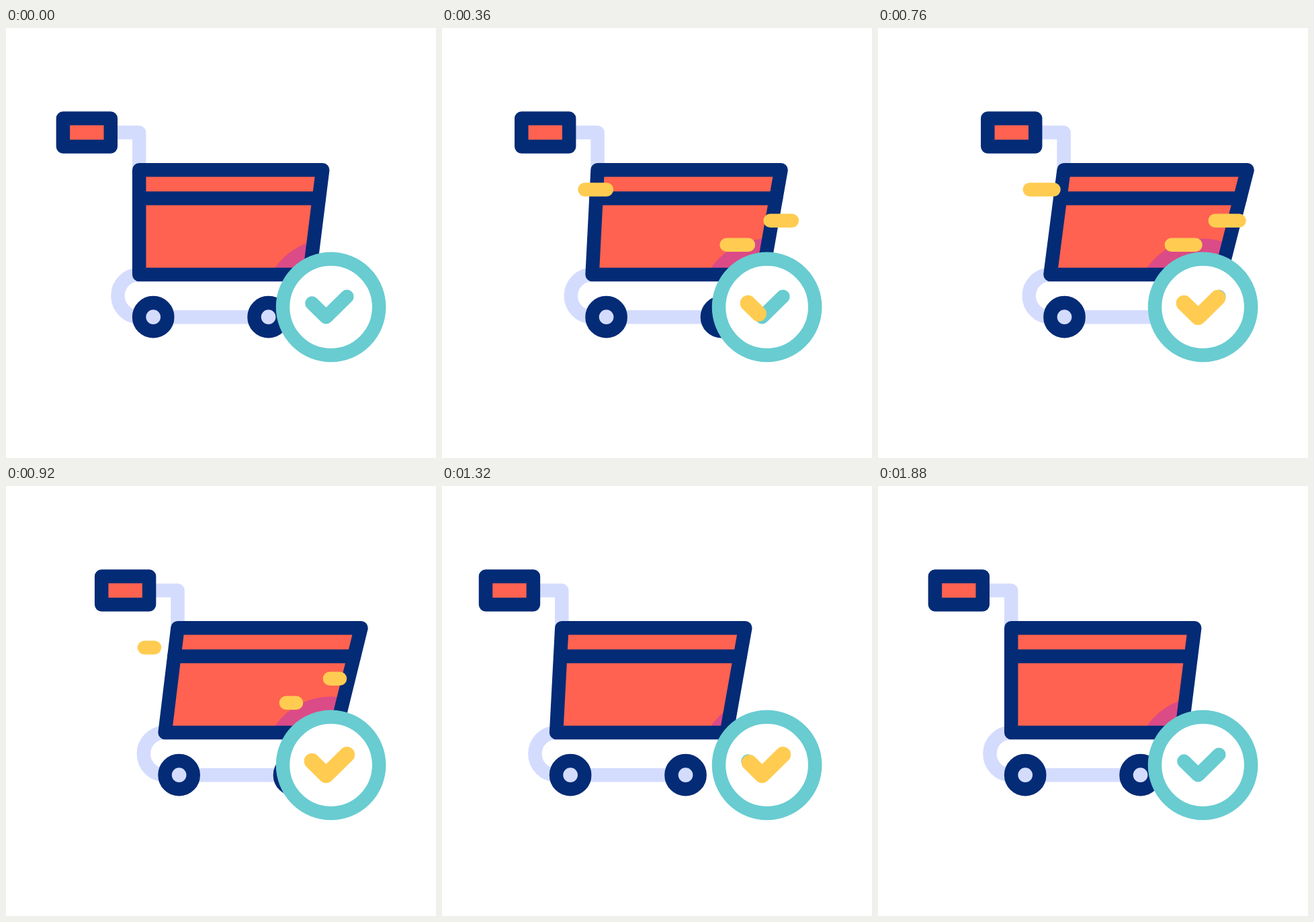
Write an HTML page with a canvas that moves like this. It is 640 px wide and 640 px high and loops after 2000 ms.

```html
<!DOCTYPE html>
<html lang="en">
<head>
<meta charset="utf-8">
<title>Shopping cart</title>
<style>
  html, body { margin: 0; width: 100%; height: 100%; overflow: hidden; background: #fff; }
  canvas { display: block; }
</style>
</head>
<body>
<canvas width="640" height="640"></canvas>
<script>
const ctx = document.querySelector('canvas').getContext('2d');
const LOOP = 2000, STEP = 40, STROKE = 20.5;
const NAVY = '#042b76', RED = '#ff6250', PINK = '#db4b87', PALE = '#d4dcfe',
      TEAL = '#68ccd1', YELLOW = '#ffcc51';

// Keyframes: [time, value]
const TOP = [[80, 0], [700, 80], [1370, -21], [1775, 0]];
const BASE = [[80, 0], [695, 60], [1353, -28.5], [1767, 0]];

const progress = (t, from, to) => Math.min(1, Math.max(0, (t - from) / (to - from)));
const smooth = u => u * u * (3 - 2 * u);

// cubic-bezier(.42, 0, .58, 1), solved by bisection
function ease(u) {
  let lo = 0, hi = 1;
  for (let i = 0; i < 20; i++) {
    const p = (lo + hi) / 2, q = 1 - p;
    if (3 * p * q * (0.42 * q + 0.58 * p) + p ** 3 < u) lo = p; else hi = p;
  }
  return smooth(lo);
}

function track(keys, t) {
  let value = keys[0][1];
  for (let i = 1; i < keys.length; i++) {
    const [t0, v0] = keys[i - 1], [t1, v1] = keys[i];
    if (t > t0) value = v0 + (v1 - v0) * ease(progress(t, t0, t1));
  }
  return value;
}

function poly(points, close) {
  const path = new Path2D();
  points.forEach(([x, y]) => path.lineTo(x, y));
  if (close) path.closePath();
  return path;
}

function circle(x, y, r) {
  const path = new Path2D();
  path.arc(x, y, r, 0, 7);
  return path;
}

function stroke(path, color, width = STROKE) {
  ctx.strokeStyle = color;
  ctx.lineWidth = width;
  ctx.stroke(path);
}

function fill(path, color) {
  ctx.fillStyle = color;
  ctx.fill(path);
}

function drawBase(dx) {
  ctx.save();
  ctx.translate(dx, 0);
  stroke(new Path2D('M198 367A31.5 31.5 0 0 0 198 430.2H390'), PALE);
  for (const x of [219.2, 390.6]) {
    fill(circle(x, 430.2, 14), PALE);
    stroke(circle(x, 430.2, 21.1), NAVY);
  }
  ctx.restore();
}

function drawHandle(dx) {
  ctx.save();
  ctx.translate(dx, 0);
  stroke(poly([[150, 155.5], [198.2, 155.5], [198.2, 211.2]]), PALE);
  const grip = poly([[84.9, 134.5], [155.8, 134.5], [155.8, 176.6], [84.9, 176.6]], true);
  fill(grip, RED);
  stroke(grip, NAVY);
  ctx.restore();
}

function drawBasket(top, base) {
  const basket = poly([[198.2 + top, 211.2], [471.2 + top, 211.2],
                       [451.7 + base, 367], [198.2 + base, 367]], true);
  fill(basket, RED);
  ctx.save();
  ctx.clip(basket);
  fill(circle(483.6, 415.3, 101.7), PINK);
  ctx.restore();
  const mid = top + (base - top) * 0.27;
  stroke(poly([[198.2 + mid, 253.4], [465.9 + mid, 253.4]]), NAVY);
  stroke(basket, NAVY);
}

function drawDashes(t, dx) {
  const head = ease(progress(t, 80, 570)), tail = ease(progress(t, 500, 1170));
  if (head <= tail) return;
  for (const [x, y] of [[219.5, 240.6], [495.5, 286.8], [430.5, 322.7]])
    stroke(poly([[x + dx - 52 * tail, y], [x + dx - 52 * head, y]]), YELLOW);
}

function drawBadge(t) {
  const ring = circle(483.6, 415.3, 71.6);
  fill(ring, '#fff');
  stroke(ring, TEAL);
  const tick = poly([[455.4, 409.6], [476.4, 430.3], [507.4, 399.8]]);
  stroke(tick, TEAL);
  const length = 73;
  const head = smooth(progress(t, 80, 845)), tail = ease(progress(t, 1232, 1848));
  if (head <= tail) return;
  ctx.setLineDash([(head - tail) * length, 2 * length]);
  ctx.lineDashOffset = -tail * length;
  stroke(tick, YELLOW, 23.5);
  ctx.setLineDash([]);
}

function frame() {
  const t = Math.floor(performance.now() % LOOP / STEP) * STEP;
  const top = track(TOP, t), base = track(BASE, t);
  ctx.clearRect(0, 0, 640, 640);
  ctx.lineCap = ctx.lineJoin = 'round';
  drawBase(base);
  drawHandle(top);
  drawBasket(top, base);
  drawDashes(t, base);
  drawBadge(t);
  requestAnimationFrame(frame);
}
frame();
</script>
</body>
</html>
```
